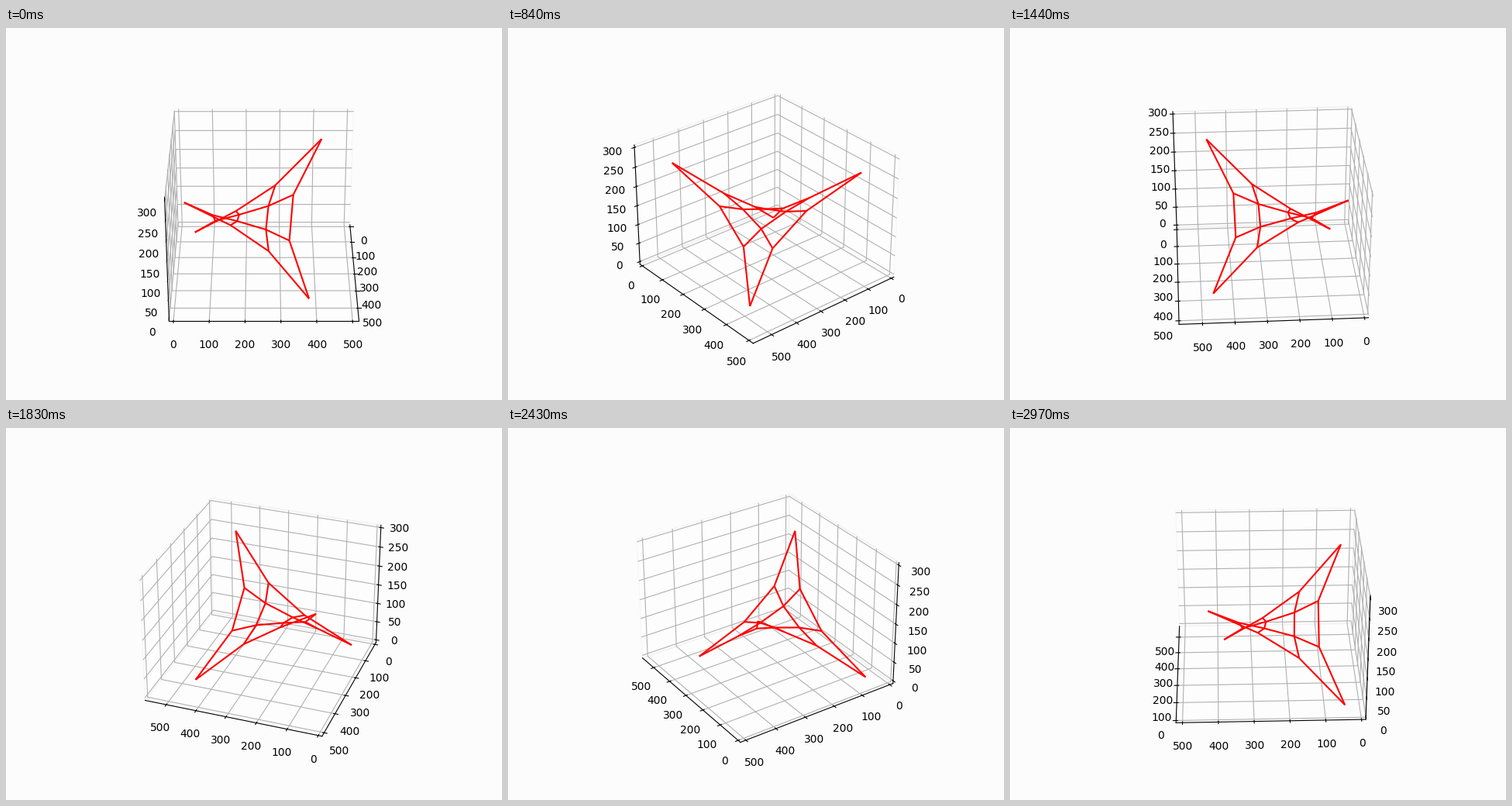
Recreate the animation shown at these times as a matplotlib script. Size 640 px wide and 480 px high, loop 3 s.

```python
import numpy as np
import matplotlib.pyplot as plt
from matplotlib.animation import FuncAnimation

FRAMES, INTERVAL = 100, 30
BACK = "#fcfcfc"
N = 4
ANCHORS = {(0, 0): (48, 423, 250), (0, -1): (462, 381, 0),
           (-1, 0): (55, 42, 0), (-1, -1): (466, 34, 250)}


def neighbour_sum(a):
    """Add up the up, down, left and right neighbours inside the grid."""
    p = np.pad(a, ((1, 1), (1, 1), (0, 0)))
    return p[:-2, 1:-1] + p[2:, 1:-1] + p[1:-1, :-2] + p[1:-1, 2:]


def relaxed_net(steps=300):
    """Cable net at rest: each free node is the mean of its neighbours."""
    net = np.zeros((N, N, 3))
    degree = neighbour_sum(np.ones((N, N, 1)))
    for _ in range(steps):
        for node, point in ANCHORS.items():
            net[node] = point
        net = neighbour_sum(net) / degree
    for node, point in ANCHORS.items():
        net[node] = point
    return net


fig = plt.figure(figsize=(6.4, 4.8), dpi=100, facecolor=BACK)
ax = fig.add_subplot(projection="3d", facecolor=BACK)
ax.plot_wireframe(*np.moveaxis(relaxed_net(), -1, 0), color="red", linewidth=1.5)
ax.set(xlim=(-12.2, 572.2), ylim=(-12, 518), zlim=(-7.3, 306.3))
for axis in (ax.xaxis, ax.yaxis, ax.zaxis):
    axis.pane.set_facecolor((1, 1, 1, 0))


def update(i):
    ax.view_init(elev=30, azim=180 * i / FRAMES)
    return ()


anim = FuncAnimation(fig, update, frames=FRAMES, interval=INTERVAL,
                     init_func=lambda: (), repeat=True, repeat_delay=0)
plt.show()
```
